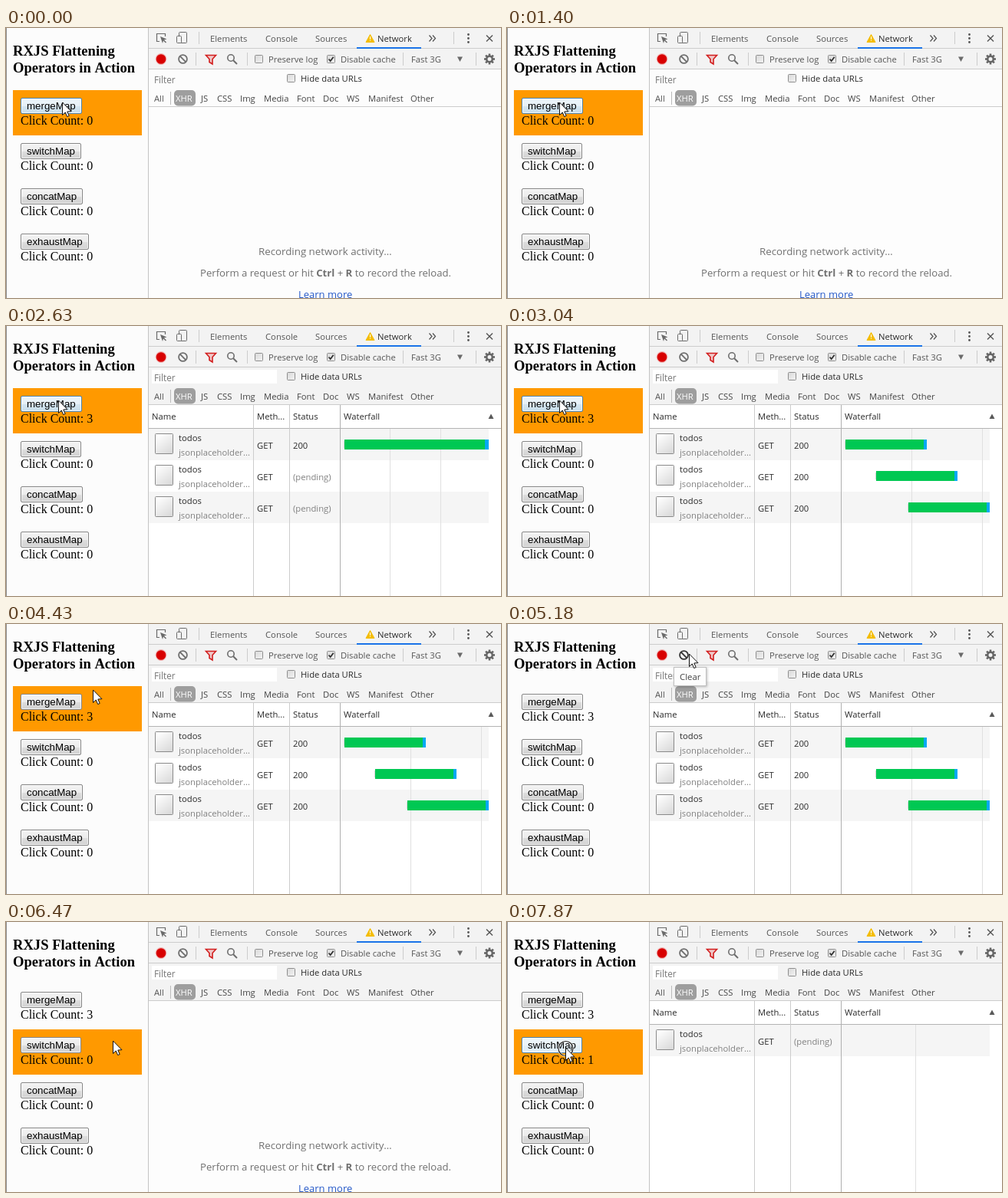
An HTML page with a canvas that plays this animation: 645 px wide and 352 px high, repeating every 7990 ms.

```html
<!DOCTYPE html>
<html lang="en">
<head>
<meta charset="utf-8">
<title>RXJS Flattening Operators in Action</title>
<style>
html, body { margin: 0; width: 100%; height: 100%; overflow: hidden; background: #fcfcfc; }
canvas { display: block; }
</style>
</head>
<body>
<canvas id="stage" width="645" height="352"></canvas>
<script>
const ctx = document.getElementById('stage').getContext('2d', { alpha: false });
const LOOP = 7990;
const UI = '"Open Sans", "Noto Sans", sans-serif';
const SERIF = '"Liberation Serif", serif';
const SANS = '"Liberation Sans", sans-serif';
const GREY = '#555555', DARK = '#2a2a2a', LINE = '#cccccc';

// Each entry: [start time, values...]; the last one reached applies.
const CURSOR = [
  [0, 73, 97], [1400, 68, 97], [4430, 113, 86], [4550, 205, 58], [4670, 300, 48],
  [4790, 350, 60], [4910, 356, 82], [5060, 237, 39], [5910, 242, 84], [6030, 246, 133],
  [6190, 255, 145], [6350, 215, 152], [6470, 139, 155], [6610, 102, 155],
  [6890, 86, 162], [7040, 76, 164]
];
const MERGE_COUNT = [[0, 0], [1970, 1], [2210, 2], [2480, 3]];
const SWITCH_COUNT = [[0, 0], [7750, 1]];
const ROWS = [[0, 0], [2090, 1], [2330, 2], [2480, 3], [5630, 0], [7870, 1]];
const DONE = [[0, 0], [2630, 1], [2780, 2], [3040, 3], [5630, 0]];
const RING = [[0, 0], [1810, 1], [2480, 0], [7600, 1]];
const ACTIVE_ROW = [[0, 0], [4550, -1], [6470, 1]];

// Button colours: border, then the upper and lower half gradients.
const BUTTON = {
  normal: ['#858585', '#f3f3f3', '#ececec', '#dedede', '#d1d1d1'],
  hover: ['#4a82ad', '#eff6fa', '#e5f0f7', '#d5e6f1', '#c8deeb'],
  pressed: ['#4a82ad', '#eef6fb', '#ebf4fa', '#e4f0f8', '#deedf7']
};

const at = (list, t) => list.filter(e => e[0] <= t).pop().slice(1);
const val = (list, t) => at(list, t)[0];

function rect(x, y, w, h, color) {
  ctx.fillStyle = color;
  ctx.fillRect(x, y, w, h);
}
const vline = (x, y0, y1, color = LINE) => rect(x, y0, 1, y1 - y0, color);
const hline = (y, x0, x1, color = LINE) => rect(x0, y, x1 - x0, 1, color);

function text(s, x, y, color = GREY, size = 11.25, family = UI, weight = 400) {
  ctx.font = `${weight} ${size}px ${family}`;
  ctx.fillStyle = color;
  ctx.fillText(s, x, y);
  return ctx.measureText(s).width;
}

function poly(points, fill, stroke, width = 1) {
  ctx.beginPath();
  points.forEach(([x, y], i) => i ? ctx.lineTo(x, y) : ctx.moveTo(x, y));
  ctx.closePath();
  paint(fill, stroke, width);
}
function circle(x, y, r, fill, stroke, width = 1) {
  ctx.beginPath();
  ctx.arc(x, y, r, 0, Math.PI * 2);
  paint(fill, stroke, width);
}
function box(x, y, w, h, r, fill, stroke) {
  ctx.beginPath();
  ctx.roundRect(x, y, w, h, r);
  paint(fill, stroke, 1);
}
function paint(fill, stroke, width) {
  if (fill) { ctx.fillStyle = fill; ctx.fill(); }
  if (stroke) { ctx.strokeStyle = stroke; ctx.lineWidth = width; ctx.stroke(); }
}
function path(points, color, width) {
  ctx.beginPath();
  points.forEach(([x, y], i) => i ? ctx.lineTo(x, y) : ctx.moveTo(x, y));
  paint(null, color, width);
}
function shade(x0, y0, x1, y1, from, to) {
  const g = ctx.createLinearGradient(x0, y0, x1, y1);
  g.addColorStop(0, from);
  g.addColorStop(1, to);
  return g;
}

function drawButton(label, y, w, look) {
  const [border, a, b, c, d] = BUTTON[look];
  rect(20, y + 1, w - 2, 10, shade(0, y, 0, y + 11, a, b));
  rect(20, y + 11, w - 2, 9, shade(0, y + 11, 0, y + 20, c, d));
  box(20.5, y + 1.5, w - 3, 18, 1, null, 'rgba(255,255,255,.7)');
  box(19.5, y + 0.5, w - 1, 20, 1.5, null, border);
  text(label, 27, y + 15, '#000', 13.33, SANS);
}

function drawPage(t) {
  rect(0, 0, 185, 352, '#fcfcfc');
  vline(0, 0, 352, '#8c8c8c');
  text('RXJS Flattening', 9, 36, '#000', 18.6, SERIF, 700);
  text('Operators in Action', 9, 58, '#000', 18.6, SERIF, 700);

  const active = val(ACTIVE_ROW, t);
  const counts = [val(MERGE_COUNT, t), val(SWITCH_COUNT, t), 0, 0];
  const pressed = (t >= 1970 && t < 2480) || t >= 7750;
  const hover = t < 4430 || t >= 6890;
  const items = [['mergeMap', 80], ['switchMap', 79], ['concatMap', 81], ['exhaustMap', 89]];
  items.forEach(([name, w], i) => {
    const y = 81 + 59 * i;
    const on = i === active;
    if (on) rect(9, y, 168, 59, '#ff9900');
    const look = on && pressed ? 'pressed' : on && hover ? 'hover' : 'normal';
    drawButton(name, y + 10, w, look);
    text('Click Count: ' + counts[i], 19, y + 45, '#000', 16, SERIF);
  });
}

function drawTabs() {
  rect(186, 0, 459, 54, '#f3f3f3');
  hline(26, 186, 645);
  // element picker
  path([[207.5, 11], [207.5, 7.5], [196.5, 7.5], [196.5, 17.5], [200, 17.5]], '#6a6a6a', 1.2);
  poly([[201, 11], [209.5, 14.5], [206, 15.5], [209, 18.5], [208, 19.5], [205, 16.5], [204, 20]], '#6a6a6a');
  // device toggle
  box(225.5, 5.5, 10, 14, 1, null, '#6a6a6a');
  box(222.5, 10.5, 6, 9, 1, '#f3f3f3', '#6a6a6a');
  vline(251, 5, 21);

  text('Elements', 266, 18);
  text('Console', 338, 18);
  text('Sources', 403, 18);
  poly([[474.5, 8.5], [480, 18.5], [469, 18.5]], '#f4bd00', '#f4bd00');
  rect(474, 11, 1, 4, '#fff');
  rect(474, 16, 1, 1, '#fff');
  text('Network', 484, 18, DARK);
  rect(457, 25, 84, 2, '#1a73e8');
  for (const x of [551.5, 556]) path([[x, 9.5], [x + 3.5, 13.5], [x, 17.5]], GREY, 1.3);
  vline(583, 5, 21);
  for (const y of [8.5, 13.5, 18.5]) circle(602.5, y, 1.4, '#555');
  path([[626, 9.5], [634, 17.5]], '#555', 1.4);
  path([[634, 9.5], [626, 17.5]], '#555', 1.4);
}

function checkbox(x, y, on) {
  box(x + 0.5, y + 0.5, 10, 10, 1, shade(x, y, x + 11, y + 11, '#d8d8d8', '#f4f4f4'), '#8e8e8e');
  if (on) path([[x + 2.5, y + 5.5], [x + 4.7, y + 8], [x + 8.7, y + 2.8]], '#333', 1.8);
}

function drawGear(x, y) {
  ctx.strokeStyle = '#666';
  ctx.lineWidth = 2.6;
  for (let i = 0; i < 8; i++) {
    const a = i * Math.PI / 4, c = Math.cos(a), s = Math.sin(a);
    ctx.beginPath();
    ctx.moveTo(x + c * 4, y + s * 4);
    ctx.lineTo(x + c * 7, y + s * 7);
    ctx.stroke();
  }
  circle(x, y, 3.8, null, '#666', 2.6);
}

function drawToolbar(t) {
  hline(53, 186, 645);
  circle(202, 40.5, 7.4, '#f1b4b4');
  circle(202, 40.5, 6.3, '#d80000');
  const clear = t >= 5060 && t < 5910 ? '#333' : '#6e6e6e';
  circle(230.5, 40.5, 5.4, null, clear, 1.8);
  path([[226.7, 36.7], [234.3, 44.3]], clear, 1.8);
  vline(247, 32, 49);
  poly([[260.5, 35.5], [273.5, 35.5], [269, 40.5], [269, 47], [265, 44.5], [265, 40.5]], '#f0c9c9', '#d21f1f', 1.6);
  circle(293, 39, 4.2, null, '#6e6e6e', 1.6);
  path([[296.2, 42.2], [301, 47]], '#6e6e6e', 2);
  vline(314, 32, 49);
  checkbox(324, 35, false);
  text('Preserve log', 342, 45);
  checkbox(418, 35, true);
  text('Disable cache', 436, 45);
  vline(517, 32, 49);
  text('Fast 3G', 528, 45);
  poly([[588, 37.5], [595, 37.5], [591.5, 44]], '#6a6a6a');
  vline(612, 32, 49);
  drawGear(630, 40.5);
}

function drawFilters(t) {
  rect(186, 54, 459, 48, t < 1970 ? '#fcfcfc' : '#f3f3f3');
  rect(190, 57, 163, 18, t < 1970 ? '#fcfcfc' : '#fff');
  text('Filter', 193, 72, '#777', 11.8);
  checkbox(366, 60, false);
  text('Hide data URLs', 384, 70, DARK);
  text('All', 193, 96);
  vline(214, 83, 100, '#bbb');
  box(219, 81, 28, 20.5, 5, '#9e9e9e');
  text('XHR', 221, 96, '#fff');
  const types = [['JS', 254], ['CSS', 275], ['Img', 305], ['Media', 336], ['Font', 379],
    ['Doc', 413], ['WS', 444], ['Manifest', 472], ['Other', 527]];
  for (const [name, x] of types) text(name, x, 96, '#444');
  hline(102, 186, 645);
}

function drawEmpty() {
  const size = 13.15, color = '#707070';
  text('Recording network activity…', 329, 296, color, 13.3);
  const parts = [['Perform a request or hit ', 400], ['Ctrl', 700], [' + ', 400], ['R', 700],
    [' to record the reload.', 400]];
  let x = 253;
  for (const [s, weight] of parts) x += text(s, x, 324, color, size, UI, weight);
  text('Learn more', 381, 352, '#2458c8', 13);
}

function drawTable(rows, done) {
  const rowY = i => Math.floor(134 + 41.3 * i);
  for (let i = 0; i < rows; i += 2) rect(186, rowY(i), 443, rowY(i + 1) - rowY(i), '#f5f5f5');

  // Waterfall scale: px per ms, fitted to the latest finished request.
  const starts = [0, 218, 446], took = 575;
  const scale = done ? 188 / (took + starts[done - 1]) : 0;
  let step = rows === 3 ? 84 : 97;
  if (done) step = scale * (done === 3 ? 500 : 200);
  for (let x = 435 + step; x < 628; x += step) vline(Math.round(x), 134, 352, '#e0e0e0');

  for (let i = 0; i < rows; i++) {
    const y = rowY(i);
    box(194.5, y + 6.5, 23, 26, 1, shade(197, y + 8, 215, y + 32, '#ffffff', '#d9d9d9'), '#8a8a8a');
    text('todos', 225, y + 16, DARK);
    text('jsonplaceholder...', 225, y + 35, '#808080');
    text('GET', 327, y + 26, DARK);
    const ready = i < done;
    text(ready ? '200' : '(pending)', 374, y + 26, ready ? DARK : '#808080');
    if (ready) {
      const x = Math.round(441 + starts[i] * scale), end = Math.round(x + took * scale);
      const blue = done === 1 ? 5 : 4;
      rect(x - 1, y + 16, 1, 9, '#d6d6d6');
      rect(x, y + 14, end - x - blue, 13, '#00c853');
      rect(end - blue, y + 14, blue, 13, '#03a9f4');
    }
  }

  text('Name', 190, 122, DARK);
  text('Meth...', 327, 122, DARK);
  text('Status', 374, 122, DARK);
  text('Waterfall', 440, 122, DARK);
  poly([[628.5, 121], [635.5, 121], [632, 114.5]], '#5a5a5a');
  hline(133, 186, 645, '#b4b4b4');
  vline(322, 103, 352);
  vline(369, 103, 352);
  vline(435, 103, 352, '#b0b0b0');
}

function drawTooltip() {
  ctx.save();
  ctx.shadowColor = 'rgba(0,0,0,.25)';
  ctx.shadowBlur = 3;
  ctx.shadowOffsetX = ctx.shadowOffsetY = 1;
  rect(217, 56, 43, 25, '#fdfdfd');
  ctx.restore();
  ctx.lineWidth = 1;
  ctx.strokeStyle = '#c0c0c0';
  ctx.strokeRect(217.5, 56.5, 42, 24);
  text('Clear', 225, 73, '#444', 11.4);
}

function drawCursor(x, y, ring) {
  if (ring) {
    circle(x + 0.5, y + 1, 9.5, null, 'rgba(255,255,255,.85)', 2.4);
    circle(x + 0.5, y + 1, 9.5, null, '#222', 1.2);
  }
  const shape = [[0, 0], [0, 16.5], [3.8, 13], [6.2, 18.6], [8.7, 17.5], [6.3, 12], [11.5, 11.7]];
  poly(shape.map(([dx, dy]) => [x + 0.5 + dx, y + dy]), '#fff', '#111', 1);
}

function draw(t) {
  rect(0, 0, 645, 352, '#fff');
  drawPage(t);
  drawTabs();
  drawToolbar(t);
  drawFilters(t);
  const rows = val(ROWS, t);
  if (rows) drawTable(rows, val(DONE, t));
  else {
    rect(186, 103, 459, 249, '#fdfdfd');
    drawEmpty();
  }
  vline(185, 0, 352, '#c4c4c4');
  if (t >= 5180 && t < 5630) drawTooltip();
  drawCursor(...at(CURSOR, t), val(RING, t));
}

const begin = performance.now();
function tick() {
  draw((performance.now() - begin) % LOOP);
  requestAnimationFrame(tick);
}
tick();
</script>
</body>
</html>
```
